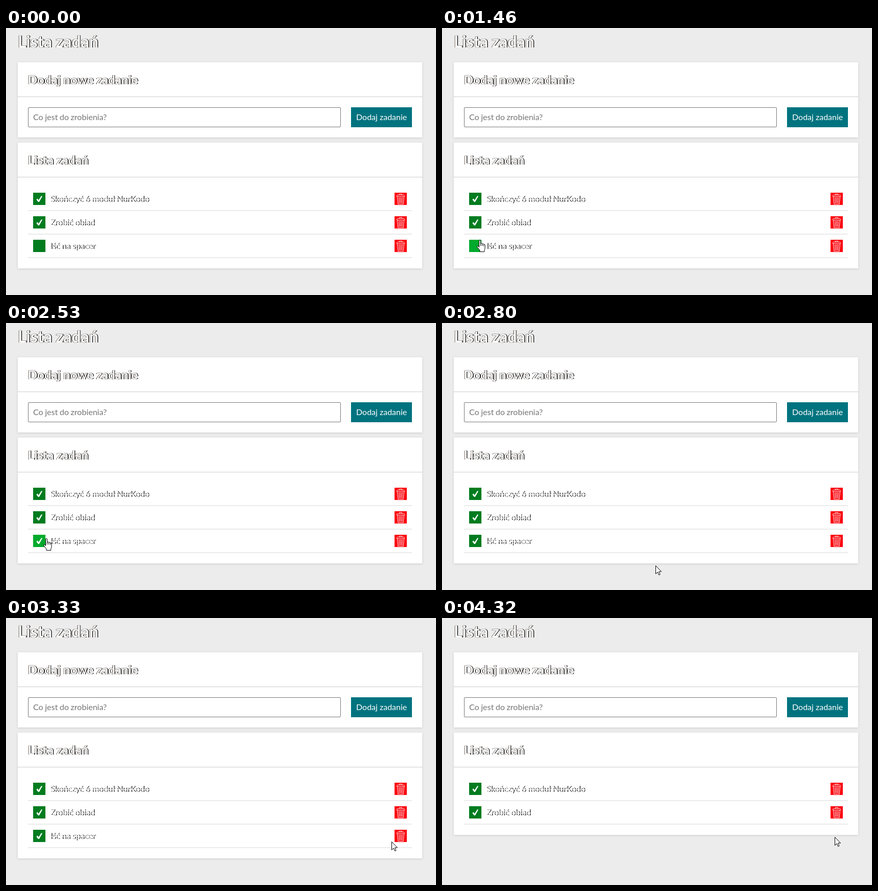
An HTML page for the animation above (4.98 s loop, 840 by 522 pixels).

```html
<!DOCTYPE html>
<html lang="pl">
<head>
<meta charset="utf-8">
<title>Lista zadań</title>
<style>
  html, body { margin: 0; width: 100%; height: 100%; overflow: hidden; background: #ececec; }
  svg { display: block; width: 840px; height: 522px; font: 16px Lato, sans-serif; }
  .panel { fill: #fff; filter: drop-shadow(0 1px 2px #ccc); }
  .ink { text-rendering: geometricPrecision; }
  .tight { word-spacing: -.5px; }
  .hidden { visibility: hidden; }
  .done { fill: #007c1f; }
  .done.hover { fill: #00aa2d; }
  .trash { fill: #fb0510; }
  .trash.hover { fill: #ff393e; }
</style>
</head>
<body>
<svg id="stage" viewBox="0 0 840 522">
  <defs>
    <path id="check" d="M6.3 13.2 L8.6 11.6 L10.8 14.6 L15.8 6.4 L18.2 6.6 L11.8 18 H9.8 Z" fill="#fff"/>
    <g id="bin" fill="none" stroke="#ffd0cd">
      <path d="M9.5 4.5 V2.5 H14.5 V4.5 M4.5 7.5 V5.5 L6 4.5 H18 L19.5 5.5 V7.5 Z"/>
      <path d="M5.5 7.5 L7 22.5 H17 L18.5 7.5 M9 9 L9.5 20.5 M12 9 V20.5 M15 9 L14.5 20.5" stroke-width="1.2"/>
    </g>
  </defs>
  <rect class="panel" x="23" y="67" width="790" height="147"/>
  <rect class="panel" id="list" x="23" y="224" width="790" height="246"/>
  <path d="M23 134.5 H813 M23 291.5 H813" stroke="#ccc"/>
  <rect x="43.5" y="155.5" width="610" height="38" rx="1.5" fill="#fff" stroke="#767676"/>
  <text class="tight" x="53" y="180" fill="#757575">Co jest do zrobienia?</text>
  <rect x="674" y="155" width="119" height="39" fill="#00737f"/>
  <text x="684" y="180" fill="#fff">Dodaj zadanie</text>
  <g id="content" class="tight"></g>
  <g id="cursor" class="hidden" fill="#fff" stroke="#000" stroke-linejoin="round">
    <path id="arrow" d="M.5 .5 V16.5 L4.2 13 L6.7 18.6 L9 17.6 L6.6 12 H11.5 Z"/>
    <g id="hand">
      <path d="M-1.5 13 V2 Q-1.5 .5 0 .5 T1.5 2 V8 Q2 6.6 3.4 7 T4.5 8.5 Q5.2 7.4 6.4 7.8 T7.4 9.3 Q8.2 8.5 9.2 9.2 T10 11 V16 Q10 18.5 8.6 20.5 V23.5 H0 V21 L-5.2 14.2 Q-6 12.6 -4.8 12 T-1.5 14.5 Z"/>
      <path d="M1.5 8 V12 M4.5 8.5 V12 M7.4 9.3 V12.5" fill="none"/>
    </g>
  </g>
</svg>
<script>
const LOOP = 4980, CHECK_AT = 2190, REMOVE_AT = 4190, ARROW_AT = 4320;
const $ = id => document.getElementById(id);

function add(parent, tag, attrs, text) {
  const el = document.createElementNS("http://www.w3.org/2000/svg", tag);
  for (const k in attrs) el.setAttribute(k, attrs[k]);
  if (text) el.textContent = text;
  parent.appendChild(el);
  return el;
}

// Hollow lettering: stacked copies, each [offset, colour]
function hollow(parent, x, y, size, weight, text, layers) {
  for (const [dx, fill] of layers)
    add(parent, "text", { class: "ink", x: x + dx, y, fill, "font-size": size, "font-weight": weight }, text);
}

const content = $("content");
const edges = [[-.8, "#4a3c30"], [1.2, "#000"], [0, "#fff"]];
const thin = [[.4, "#000"], [-.8, "#fff"]];
hollow(content, 23, 38, 32, 700, "Lista zadań", edges);
hollow(content, 43, 110, 24, 700, "Dodaj nowe zadanie", edges);
hollow(content, 43, 267, 24, 700, "Lista zadań", edges);

function addTask(text, i) {
  const row = add(content, "g", { transform: `translate(0 ${322 + 46 * i})` });
  const box = add(row, "rect", { class: "done", x: 53, width: 24, height: 24 });
  const tick = add(row, "use", { href: "#check", x: 53 });
  hollow(row, 87, 18, 16, 400, text, thin);
  const strike = add(row, "rect", { x: 86, y: 13, width: 200, height: 1, fill: "#fff" });
  const bin = add(row, "rect", { class: "trash", x: 759, width: 24, height: 24 });
  add(row, "use", { href: "#bin", x: 759 });
  add(row, "rect", { x: 43, y: 34, width: 750, height: 2, fill: "#ebebeb" });
  return { row, box, tick, strike, bin };
}
const tasks = ["Skończyć 6 moduł NurKodo", "Zrobić obiad", "Iść na spacer"].map(addTask);
const last = tasks[2];

// Cursor positions: [time, x, y], each held until the next
const steps = [];
function glide(t0, t1, n, a, c, b, ease) {
  for (let i = 0; i < n; i++) {
    const p = i / (n - 1), u = ease(p), v = 1 - u;
    const at = k => Math.round(v * v * a[k] + 2 * u * v * c[k] + u * u * b[k]);
    steps.push([t0 + (t1 - t0) * p, at(0), at(1)]);
  }
}
const easeOut = p => 1 - (1 - p) ** 2;
const easeInOut = p => p * p * (3 - 2 * p);
glide(990, 1460, 8, [215, 507], [130, 440], [74, 414], easeOut);
steps.push([1530, 75, 415], [1590, 75, 416], [1790, 75, 416], [1860, 76, 416], [2190, 76, 417]);
glide(2530, 3000, 8, [79, 421], [350, 500], [645, 463], easeInOut);
glide(3060, 3520, 8, [653, 462], [735, 452], [766, 429], easeOut);
steps.push([3590, 767, 429], [3660, 768, 428], [ARROW_AT, 767, 428]);

const show = (el, on) => el.classList.toggle("hidden", !on);

function draw(t) {
  const checked = t >= CHECK_AT, removed = t >= REMOVE_AT;
  show(last.tick, checked);
  show(last.strike, checked);
  last.row.style.display = removed ? "none" : "";
  $("list").setAttribute("height", removed ? 200 : 246);

  const pos = steps.filter(s => s[0] <= t).pop();
  show($("cursor"), pos);
  const [, x, y] = pos || [0, -99, -99];
  const inRow = y >= 414 && y < 438;
  const onBox = inRow && x >= 53 && x < 80;
  const onBin = inRow && x >= 759 && x < 783;
  last.box.classList.toggle("hover", onBox);
  last.bin.classList.toggle("hover", onBin);
  const hand = (onBox || onBin) && t < ARROW_AT;
  $("hand").style.display = hand ? "" : "none";
  $("arrow").style.display = hand ? "none" : "";
  $("cursor").setAttribute("transform", `translate(${x} ${y})`);
}

const start = performance.now();
function tick() {
  draw((performance.now() - start) % LOOP);
  requestAnimationFrame(tick);
}
tick();
</script>
</body>
</html>
```
